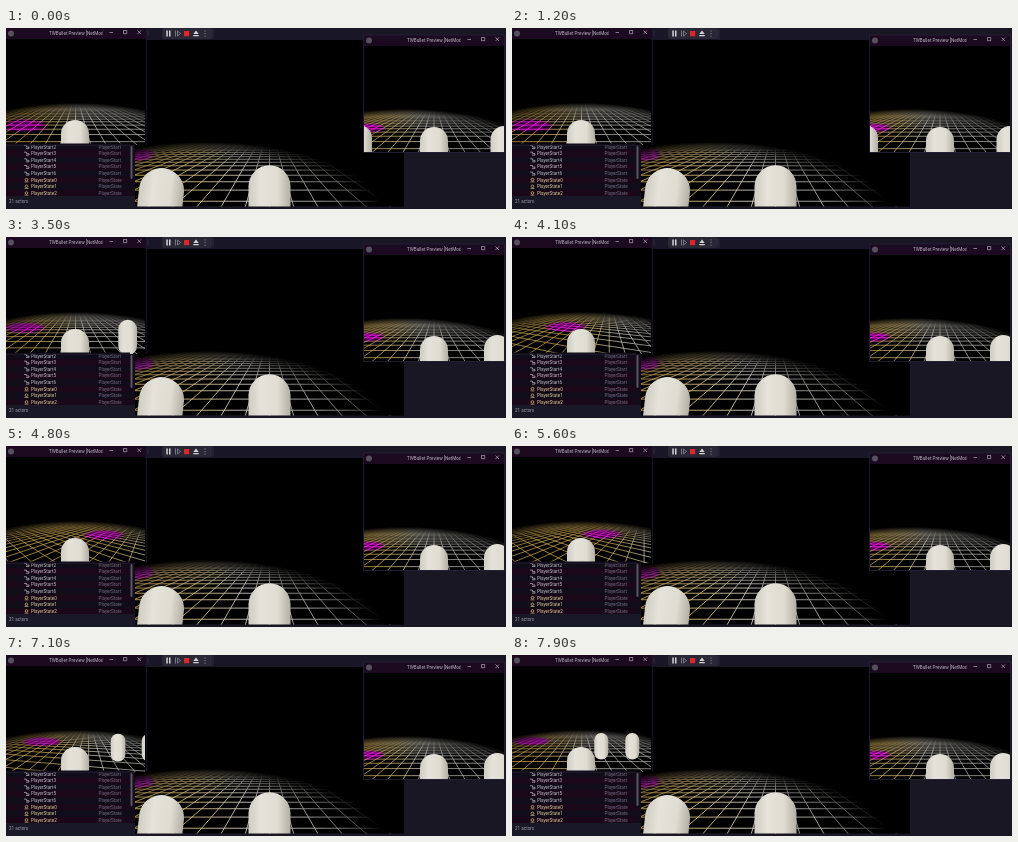
An HTML page with a canvas for the animation above (8000 ms loop, 500 by 181 pixels).

```html
<!DOCTYPE html>
<html lang="en">
<head>
<meta charset="utf-8">
<title>Multiplayer preview</title>
<style>
  html, body { margin: 0; width: 100%; height: 100%; overflow: hidden; background: #191723; }
  canvas, svg { position: absolute; left: 0; top: 0; width: 500px; height: 181px; }
  text { font: 4.6px Roboto, "Open Sans", sans-serif; fill: #b9b5c0; }
</style>
</head>
<body>
<canvas id="stage" width="500" height="181"></canvas>
<svg viewBox="0 0 500 181">
  <defs>
    <clipPath id="cut"><rect x="40" width="56.500" height="11"/></clipPath>
    <g id="bar">
      <rect width="140" height="11" fill="#1c0a20"/>
      <circle cx="5" cy="5.500" r="3" fill="#55515c"/>
      <text x="43" y="7.200" clip-path="url(#cut)">TWBullet Preview [NetMode</text>
      <path d="M103.500 4.500h3.500M117.500 2.500h3.200v3.200h-3.200zM131.500 2.500l3.500 3.500m0-3.500l-3.500 3.500" fill="none" stroke="#c9c6cf" stroke-width=".6"/>
    </g>
  </defs>
  <path d="M140 0H358V12H140z" fill="#191727"/>
  <path d="M140.500 0V117" stroke="#1c1930" stroke-width=".8"/>
  <path d="M142 3v5M207 0v11" stroke="#343148" stroke-width=".7"/>
  <rect x="156" width="50" height="11" rx="2" fill="#2a2835"/>
  <path d="M160.300 2.500h1.500v6h-1.500zM163 2.500h1.500v6H163zM187.300 6l2.700-3.500 2.700 3.500zM187.300 7h5.400v1.300h-5.400z" fill="#d5d3da"/>
  <path d="M169.500 2.500v6M171.500 3l3 2.500-3 2.500z" fill="none" stroke="#8d8a96" stroke-width=".8"/>
  <rect x="178" y="3" width="5.200" height="5.200" fill="#e0262d"/>
  <path d="M199 2.500v7" stroke="#8d8a96" stroke-dasharray="1 1.600"/>
  <rect y="117" width="129" height="64" fill="#120b18"/>
  <g id="rows"></g>
  <rect y="168" width="129" height="13" fill="#191826"/>
  <text x="3" y="174.500" style="fill:#a19da9">21 actors</text>
  <rect x="124.500" y="118" width="2" height="33" rx="1" fill="#5b5664"/>
  <path d="M0 117.300H129" stroke="#2a2436" stroke-width=".6"/>
  <use href="#bar"/>
  <use href="#bar" x="358" y="7"/>
  <rect x="357.600" y="7" width="140.800" height="117.400" fill="none" stroke="#25223a" stroke-width=".8"/>
</svg>
<script>
const ctx = document.getElementById('stage').getContext('2d');
const LOOP = 8000, CELL = 0.29, LINES = 42;

document.getElementById('rows').innerHTML = Array.from({ length: 8 }, (_, i) => {
  const y = 118.8 + i * 6.65, state = i > 4;
  const type = state ? 'PlayerState' : 'PlayerStart';
  const icon = state
    ? `<circle cx="20.500" cy="${y - 0.4}" r="1.300" fill="none" stroke="#c9ac72" stroke-width=".8"/><path d="M18.500 ${y + 1.8}h4" stroke="#c9ac72" stroke-width=".7"/>`
    : `<path d="M18 ${y - 1.3}h2.500v1.500h2.500v1.500h-3" fill="none" stroke="#a9a5b0" stroke-width=".8"/>`;
  return `<rect y="${y - 3.3}" width="124" height="6.650" fill="${i % 2 ? '#1a0819' : '#110c19'}"/>${icon}
    <text x="25" y="${y + 1.7}" style="fill:${state ? '#dccb98' : '#c0bbc5'}">${type}${state ? i - 5 : i + 2}</text>
    <text x="92.500" y="${y + 1.7}" style="fill:#756c80">${type}</text>`;
}).join('');

const clamp = p => Math.min(1, Math.max(0, p));
const smooth = (t, from, to) => {
  const p = clamp((t - from) / (to - from));
  return p * p * (3 - 2 * p);
};

function ramp(gradient, stops) {
  stops.forEach(([p, color]) => gradient.addColorStop(p, color));
  return gradient;
}

function ellipse([x, y, rx, ry], stops) {
  ctx.save();
  ctx.translate(x, y);
  ctx.scale(rx, ry);
  ctx.fillStyle = ramp(ctx.createRadialGradient(0, 0, 0, 0, 0, 1), stops);
  ctx.fillRect(-20, -20, 40, 40);
  ctx.restore();
}

// Floor seen from one unit above it; each line is cut at the near plane.
function grid(v, yaw, forward) {
  const cos = Math.cos(yaw), sin = Math.sin(yaw), near = 0.4;
  const span = LINES * CELL, slide = forward % 1 * CELL;
  const spin = (x, z) => [x * cos - z * sin, x * sin + z * cos];
  const put = ([x, z]) => [v.cx + v.f * x / z, v.cy + v.f / z];
  const line = (a, b) => {
    if (a[1] > b[1]) [a, b] = [b, a];
    if (b[1] < near) return;
    if (a[1] < near) {
      const p = (near - a[1]) / (b[1] - a[1]);
      a = [a[0] + (b[0] - a[0]) * p, near];
    }
    ctx.moveTo(...put(a));
    ctx.lineTo(...put(b));
  };
  ctx.beginPath();
  for (let i = -LINES; i <= LINES; i++) {
    const c = i * CELL;
    line(spin(c, -span), spin(c, span));
    line(spin(-span, c - slide), spin(span, c - slide));
  }
  ctx.stroke();
}

// Perspective ties a capsule's top and height to its width.
function capsule(v, x, w, tilt = 0) {
  ctx.save();
  ctx.translate(x, v.cy + w);
  ctx.rotate(tilt);
  ctx.fillStyle = ramp(ctx.createLinearGradient(-w / 2, 0, w / 2, 0),
    [[0, '#d0cdc3'], [0.3, '#e4e2d9'], [0.7, '#dfdcd2'], [1, '#b3afa4']]);
  ctx.beginPath();
  ctx.roundRect(-w / 2, 0, w, w * 1.9, w / 2);
  ctx.fill();
  ctx.restore();
}

function view(v, { yaw = 0, forward = 0, white, glow, light }, capsules) {
  ctx.save();
  ctx.beginPath();
  ctx.rect(v.x, v.y, v.w, v.h);
  ctx.clip();
  ctx.fillStyle = '#000';
  ctx.fillRect(v.x, v.y, v.w, v.h);
  ctx.strokeStyle = ramp(ctx.createLinearGradient(white - v.w * 0.3, 0, white + v.w * 0.3, 0),
    [[0, '#dcb358'], [0.4, '#e0c88c'], [0.7, '#dedbd0'], [1, '#c4c3be']]);
  ctx.lineWidth = v.line;
  grid(v, yaw, forward);
  ctx.globalCompositeOperation = 'color';
  ellipse(glow, [[0, '#d010c8'], [0.6, '#d010c8'], [1, 'rgba(208,16,200,0)']]);
  ctx.globalCompositeOperation = 'source-over';
  ellipse(glow, [[0, 'rgba(180,0,170,.5)'], [0.5, 'rgba(160,0,150,.35)'], [1, 'rgba(120,0,120,0)']]);
  ellipse(light, [[0, 'rgba(0,0,0,0)'], [0.65, 'rgba(0,0,0,.06)'], [0.86, 'rgba(0,0,0,.45)'], [1, '#000']]);
  capsules.forEach(c => capsule(v, ...c));
  ctx.restore();
}

const makeView = (x, y, w, h, line) =>
  ({ x, y, w, h, line, cx: x + w / 2, cy: y + h / 2, f: h * 0.815 });
const main = makeView(129, 12, 269, 166.5, 0.85);
const left = makeView(0, 11, 139, 106, 0.7);
const right = makeView(358, 18, 140, 106, 0.7);

function draw(now) {
  const t = now % LOOP;
  const walk = clamp((t - 1300) / 6600) ** 0.455;
  const turn = smooth(t, 3500, 4800) * (1 - smooth(t, 5000, 8000));
  const arrive = smooth(t, 1300, 2700);

  ctx.fillStyle = '#191723';
  ctx.fillRect(0, 0, 500, 181);

  view(main, { white: 205, glow: [131, 126, 20, 8], light: [200, 187, 178, 73] },
    [[158, 45, 0.11], [263.5, 42]]);

  const glowY = 98 - 12 * walk, depth = glowY - left.cy;
  const guest = 172 - 83 * walk + 85 * turn, size = 26 - 12 * walk;
  view(left, {
    yaw: -0.7 * turn, forward: 6 * walk, white: 60 + 75 * turn,
    glow: [18 + 80 * turn, glowY, 14 + depth * 0.33, depth * 0.22],
    light: [70, 119, 128, 44]
  }, [[guest + 31, size], [guest, size], [69, 28]]);

  view(right, { white: 400, glow: [363, 100, 17, 5], light: [398, 126, 135, 45] },
    [[353 - 25 * arrive, 26], [498 - 6.5 * arrive, 27], [428, 28]]);

  requestAnimationFrame(draw);
}
requestAnimationFrame(draw);
</script>
</body>
</html>
```
